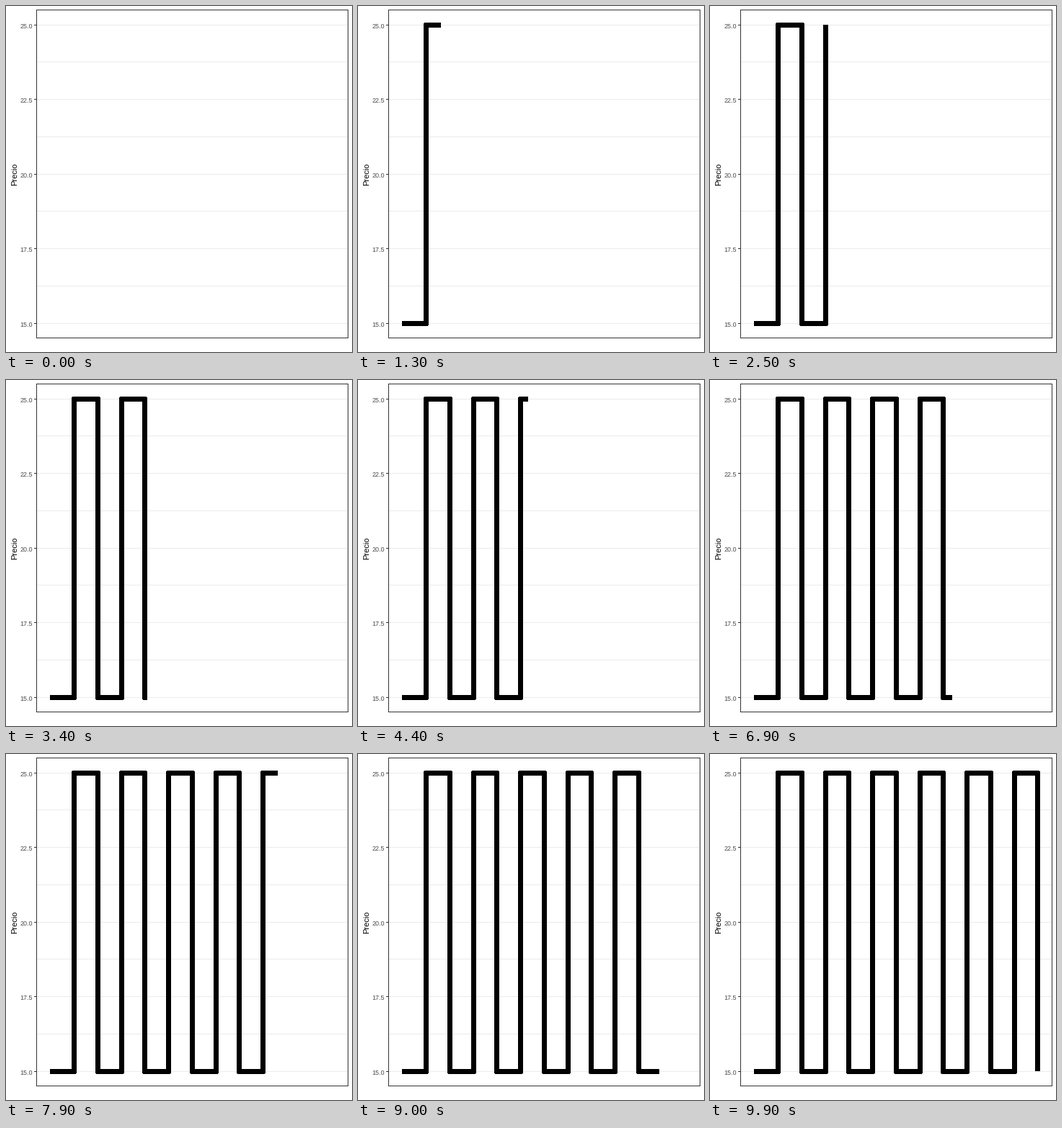
A matplotlib script that plays this animation: 480 px wide and 480 px high, repeating every 10000 ms.

```python
import matplotlib.pyplot as plt
import numpy as np
from matplotlib.animation import FuncAnimation
from matplotlib.patches import Rectangle

SIZE, DPI = 480, 72          # at 72 dpi one point is one pixel
FRAMES, STEPS = 100, 12
X0, DX = 61.48, 32.73        # first step and step width
LOW, HIGH = 440, 26          # pixel rows of prices 15 and 25
LEFT, RIGHT, TOP, BOTTOM = 42, 474, 5, 460

plt.rcParams["font.family"] = "Liberation Sans"
plt.rcParams["path.simplify"] = False

fig = plt.figure(figsize=(SIZE / DPI, SIZE / DPI), dpi=DPI, facecolor="white")
ax = fig.add_axes([0, 0, 1, 1])
ax.set_xlim(0, SIZE)
ax.set_ylim(SIZE, 0)
ax.axis("off")


def hline(x0, x1, row, color, z):
    ax.plot([x0, x1], [row + 0.5] * 2, color=color, lw=1, zorder=z,
            solid_capstyle="butt", antialiased=False, snap=False)


for i in range(9):
    row = int(HIGH + i * (LOW - HIGH) / 8)
    hline(LEFT, RIGHT, row, "#ebebeb", 1)
    if i % 2 == 0:
        hline(LEFT - 3, LEFT, row, "#333333", 4)
        ax.text(37.3, row + 5, f"{25 - 1.25 * i:.1f}", size=9, color="#4d4d4d",
                ha="right", va="baseline")

ax.add_patch(Rectangle((LEFT + 0.5, TOP + 0.5), RIGHT - LEFT, BOTTOM - TOP,
                       fill=False, ec="#333333", lw=1, zorder=4,
                       antialiased=False, snap=False))
ax.text(15.5, 233.5, "Precio", size=11, color="black", rotation=90,
        rotation_mode="anchor", ha="center", va="baseline")

price, = ax.plot([], [], color="black", lw=7, zorder=3, antialiased=False,
                 snap=False, solid_capstyle="butt", solid_joinstyle="round")

# Each step is reached on a whole frame; the tip moves linearly in between.
knots = np.round(np.linspace(0, FRAMES - 1, STEPS + 1))


def column(step):
    return round(X0 + DX * step)


def level(step):
    return HIGH if step % 2 else LOW


def reveal(frame):
    pos = np.interp(frame, knots, np.arange(STEPS + 1))
    done = int(pos)
    pts = [(column(0), LOW + 0.5)]
    for i in range(1, done + 1):
        x = column(i) + 0.5
        pts += [(x, level(i - 1) + 0.5), (x, level(i) + 0.5)]
    if pos > done:
        pts.append((column(pos), level(done) + 0.5))
    elif done:
        pts[-1] = (pts[-1][0], level(done))
    else:
        pts = []
    price.set_data([p[0] for p in pts], [p[1] for p in pts])
    return price,


anim = FuncAnimation(fig, reveal, frames=FRAMES, interval=100, repeat=True,
                     repeat_delay=0, cache_frame_data=False)
plt.show()
```
